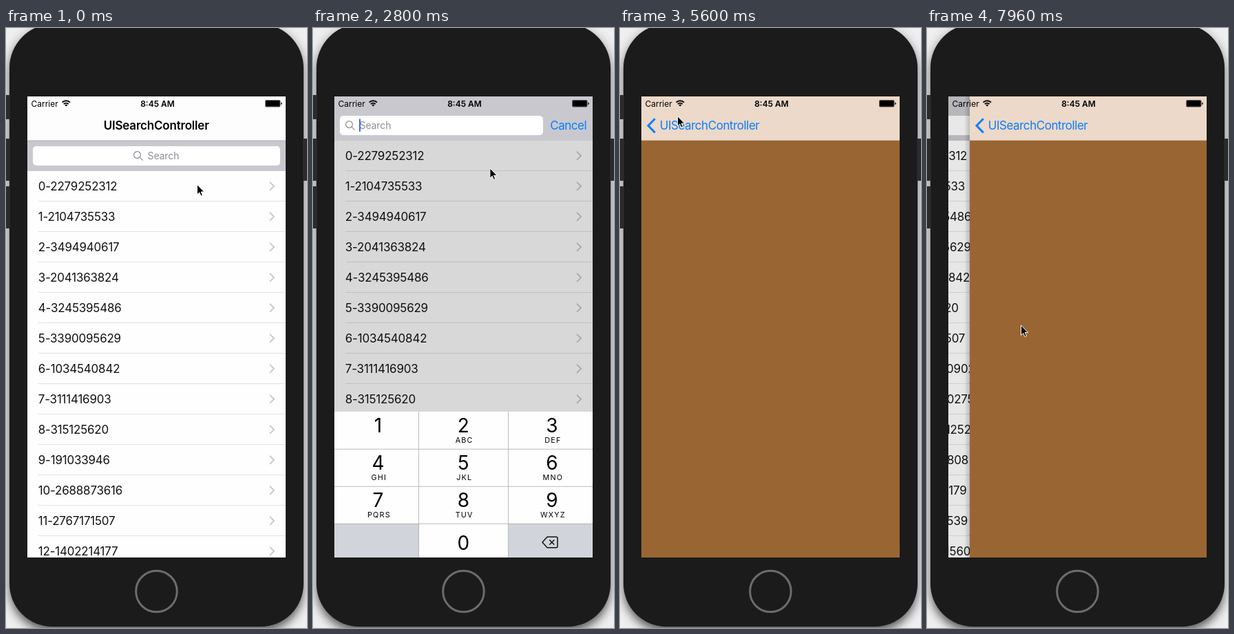
Animation of 437 by 868 pixels, one loop 8000 ms. Source, as an HTML page:

```html
<!DOCTYPE html>
<html lang="en">
<head>
<meta charset="utf-8">
<title>Search list</title>
<style>
  html, body { margin: 0; width: 100%; height: 100%; overflow: hidden; background: #efefef; }
  .device {
    position: absolute; left: 5px; top: -6px; width: 427px; height: 872px;
    border-radius: 64px 64px 62px 62px; background: #1b1b1b;
    box-shadow: 0 5px 16px rgba(0, 0, 0, .45), 0 10px 14px -4px rgba(0, 0, 0, .4);
  }
  svg { position: absolute; left: 0; top: 0; display: block; }
  text { font-family: Inter, "Open Sans", sans-serif; font-size: 17px; letter-spacing: -.45px; fill: #111; white-space: pre; }
  .row { letter-spacing: -.22px; }
  .status { font-size: 12px; letter-spacing: 0; fill: #000; }
  .bold { font-weight: 600; }
  .title { letter-spacing: -.2px; fill: #000; }
  .mid { text-anchor: middle; }
  .field { font-size: 14px; letter-spacing: -.1px; }
  .hint { fill: #8e8e93; }
  .blue { fill: #087efe; }
  .digit { font-size: 28px; letter-spacing: 0; fill: #000; }
  .letters { font-size: 10.8px; letter-spacing: 1.2px; fill: #000; }
  .line { fill: none; }
</style>
</head>
<body>
<div class="device"></div>
<svg width="437" height="868" viewBox="0 0 437 868">
  <defs>
    <clipPath id="screen"><rect x="31" y="99" width="375" height="667"/></clipPath>
    <linearGradient id="fade">
      <stop offset="0" stop-opacity="0"/>
      <stop offset="1" stop-opacity=".2"/>
    </linearGradient>
  </defs>

  <g fill="#2b2b2b">
    <rect x="-3" y="97" width="9" height="35" rx="2"/>
    <rect x="-3" y="160" width="9" height="61" rx="2"/>
    <rect x="-3" y="229" width="9" height="61" rx="2"/>
    <rect x="431" y="160" width="9" height="61" rx="2"/>
  </g>
  <circle cx="218.5" cy="815" r="29.8" fill="none" stroke="#6c6c6c" stroke-width="3"/>

  <g clip-path="url(#screen)">
    <g id="list">
      <rect x="31" y="99" width="375" height="667" fill="#fefefe"/>
      <g id="allRows"></g>
      <g id="foundRows">
        <rect id="picked" x="31" width="375" height="44" fill="#d9d9d9"/>
      </g>
      <rect id="dim" x="31" width="375" height="667"/>
      <rect x="31" y="99" width="375" height="64" fill="#fdfdfd"/>
      <text id="title" class="bold title mid" x="218.2" y="147">UISearchController</text>
      <rect id="bar" x="31" width="375" fill="#c9c8ce"/>
      <rect id="barLine" x="31" y="162.5" width="375" height="1" fill="#a9a9ad"/>
      <g id="search">
        <rect id="box" x="39" y="171" height="28" rx="5" fill="#fff"/>
        <g id="hint">
          <g class="line" stroke="#8e8e93" stroke-width="1.2">
            <circle cx="190.5" cy="183.5" r="4.9"/>
            <path d="M194.1 187.1l4.6 4.6"/>
          </g>
          <text id="hintText" class="field hint" x="205.5" y="190">Search</text>
        </g>
        <g id="typed">
          <text class="field" x="67.5" y="190">5</text>
          <circle cx="319" cy="185" r="7" fill="#8e8e93"/>
          <path class="line" d="M316.3 182.3l5.4 5.4m0-5.4l-5.4 5.4" stroke="#fff" stroke-width="1.3"/>
        </g>
        <rect id="caret" y="175.5" width="2" height="18.5" fill="#3f6bf0"/>
        <text id="cancel" class="blue" x="344.2" y="190.6">Cancel</text>
      </g>
      <rect id="shade" x="31" y="99" width="375" height="667"/>
    </g>

    <g id="page">
      <rect id="edge" x="23" y="99" width="8" height="667" fill="url(#fade)"/>
      <rect x="31" y="99" width="375" height="667" fill="#996633"/>
      <rect x="31" y="99" width="375" height="64" fill="#ecd9c9"/>
      <rect x="31" y="162.5" width="375" height=".5" fill="#a48d79"/>
      <path class="line" d="M50.8 131.2L41 141.3l9.8 10.1" stroke="#087efe" stroke-width="3"/>
      <text class="blue" x="57.7" y="147">UISearchController</text>
    </g>

    <g id="keys"></g>

    <text class="status" x="36.5" y="113.5">Carrier</text>
    <path class="line" d="M81.6 107.6a8 8 0 0 1 11.4 0M83.9 110a4.8 4.8 0 0 1 6.8 0" stroke="#000" stroke-width="1.9"/>
    <path d="M85.3 111.4a2.9 2.9 0 0 1 4 0l-2 2.2z"/>
    <text class="status bold mid" x="220" y="113.5">8:45 AM</text>
    <rect x="376" y="104" width="22.5" height="10.5" rx="2" fill-opacity=".55"/>
    <rect x="377" y="105" width="20.5" height="8.5" rx="1"/>
    <path d="M399.3 107.3q1.4.4 1.4 2t-1.4 2z"/>
  </g>

  <path id="cursor" d="M0 0V14.5L3.3 11.4 5.6 16.6 7.9 15.6 5.7 10.5H10.2Z" stroke="#fff"/>
</svg>

<script>
const LOOP = 8000;
const $ = id => document.getElementById(id);
const set = (id, attrs) => { for (const k in attrs) $(id).setAttribute(k, attrs[k]); };
const show = (id, on) => set(id, { visibility: on ? 'visible' : 'hidden' });
const move = (id, x, y) => set(id, { transform: `translate(${x} ${y})` });
const mix = (a, b, p) => a + (b - a) * p;
const within = (t, a, b) => t >= a && t < b;

// Easing
const ramp = (t, a, b) => Math.min(1, Math.max(0, (t - a) / (b - a)));
const smooth = (t, a, b) => { const u = ramp(t, a, b); return u * u * (3 - 2 * u); };
const spring = (t, start) => {
  const v = t < start ? 0 : 1 - Math.exp(-.011 * (t - start));
  return v > .996 ? 1 : v;
};

const items = `0-2279252312 1-2104735533 2-3494940617 3-2041363824 4-3245395486
  5-3390095629 6-1034540842 7-3111416903 8-315125620 9-191033946 10-2688873616
  11-2767171507 12-1402214177 14-2560970902 15-2794840275 16-1042631252
  17-554294808 18-1953517179 19-770489539 21-1365661560`.split(/\s+/);

const row = (label, y) => `
  <text class="row" x="46.8" y="${y + 28}">${label}</text>
  <path class="line" d="M383 ${y + 15.8}l6 6-6 6" stroke="#c7c7cc" stroke-width="1.9"/>
  <rect x="47" y="${y + 43}" width="359" height="1" fill="#e2e2e4"/>`;
const rows = (list, top) => list.map((label, i) => row(label, top + 44 * i)).join('');

$('allRows').innerHTML = rows(items.slice(0, 13), 207);
$('foundRows').insertAdjacentHTML('beforeend', rows(items.filter(s => s.includes('5')), 163));

// Number pad
const colX = [31, 154, 284, 406], midX = [94.5, 218.3, 347];
const letters = ['', 'ABC', 'DEF', 'GHI', 'JKL', 'MNO', 'PQRS', 'TUV', 'WXYZ'];
const keyBox = (c, r, fill, id = '') =>
  `<rect ${id} x="${colX[c]}" y="${550 + 54 * r}" width="${colX[c + 1] - colX[c]}" height="54" fill="${fill}"/>`;
const key = (s, i) => {
  const x = midX[i % 3], y = 550 + 54 * Math.floor(i / 3);
  return `<text class="digit mid" x="${x}" y="${y + 30}">${i + 1}</text>
    <text class="letters mid" x="${x + 1.4}" y="${y + 45}">${s}</text>`;
};
$('keys').innerHTML =
  '<rect x="31" y="550" width="375" height="216" fill="#fefefe"/>' +
  keyBox(0, 3, '#d1d5db') + keyBox(2, 3, '#d1d5db') + keyBox(1, 1, '#cfd3d9', 'id="pressed"') +
  [1, 2, 3].map(r => `<rect x="31" y="${549.8 + 54 * r}" width="375" height=".8" fill="#a9adb2"/>`).join('') +
  [1, 2].map(c => `<rect x="${colX[c] - .8}" y="550" width=".8" height="216" fill="#a9adb2"/>`).join('') +
  letters.map(key).join('') +
  `<text class="digit mid" x="218.3" y="749.5">0</text>
  <g class="line" stroke="#111" stroke-width="1.5">
    <path d="M340 731.2h13a2 2 0 0 1 2 2v11.6a2 2 0 0 1-2 2h-13l-7-7.8z" stroke-linejoin="round"/>
    <path d="M343.3 735.5l7 7m0-7l-7 7"/>
  </g>`;

// The screen refreshes on a coarse, steady beat once the action starts
const ACTION = 2497, BEAT = 147.5;
const hold = t => t < ACTION
  ? [0, 290, 560, 710].filter(b => b <= t).pop()
  : ACTION + BEAT * Math.floor((t - ACTION) / BEAT);

// Pointer legs: start, end, destination
const legs = [
  [0, 710, 258.5, 188],        // search field
  [2700, 3520, 212.5, 612],    // key 5
  [3900, 4600, 204.5, 289],    // a result
  [4900, 5450, 83.5, 127.5],   // back button
  [5950, 6470, 145.5, 406],    // another result
  [6950, 7510, 20, 429],       // screen edge
  [7650, 7954, 136.5, 430]     // swipe
];
const pointer = t => legs.reduce(([x, y], [a, b, toX, toY]) => {
  const p = smooth(t, a, b);
  return [mix(x, toX, p), mix(y, toY, p)];
}, [277.5, 226.5]);

function draw(t) {
  const q = smooth(t, 2476, 2776);
  const keysUp = spring(t, 2457.5) - spring(t, 4708.8);
  const push = spring(t, 4708.8) - spring(t, 6040.5) + spring(t, 6700) - .0827 * ramp(t, 7800, 7954);
  const lift = Math.floor(44 * q), typed = t > 3800;

  // Search bar rises over the title
  move('allRows', 0, -lift);
  move('search', 0, -lift);
  move('title', 0, -lift);
  set('title', { opacity: 1 - q });
  const top = 163 - Math.floor(64 * q);
  set('bar', { y: top, height: 207 - lift - top });
  set('barLine', { opacity: 1 - q });
  set('box', { width: 359 - Math.floor(64 * q) });
  move('hint', -138 * q, 0);
  set('cancel', { opacity: q });
  move('cancel', 62 * (1 - q), 0);
  set('dim', { y: 207 - lift, opacity: typed ? 0 : .15 * q });

  // Typing and results
  show('allRows', !typed);
  show('foundRows', typed);
  show('typed', typed);
  show('hintText', !typed);
  const blink = (t - (typed ? 3820 : 2640)) % 1000 < 500;
  show('caret', within(t, 2700, 4700) && blink);
  set('caret', { x: typed ? 77 : 67 });
  show('pressed', within(t, 3600, 3800));
  show('picked', within(t, 4700, 5400) || within(t, 6600, 7200));
  set('picked', { y: 162.5 + 44 * (t < 6000 ? 2 : 5) });

  // Page slides in, list trails behind it
  move('list', -112.5 * push, 0);
  set('shade', { opacity: .1 * push });
  set('edge', { opacity: mix(.4, 1, push) });
  move('page', 375 * (1 - push), 0);
  show('page', push > 0);
  move('keys', 0, Math.floor(216 * (1 - keysUp)));

  move('cursor', ...pointer(t));
}

const begin = performance.now();
function tick() {
  draw(hold((performance.now() - begin) % LOOP));
  requestAnimationFrame(tick);
}
tick();
</script>
</body>
</html>
```
